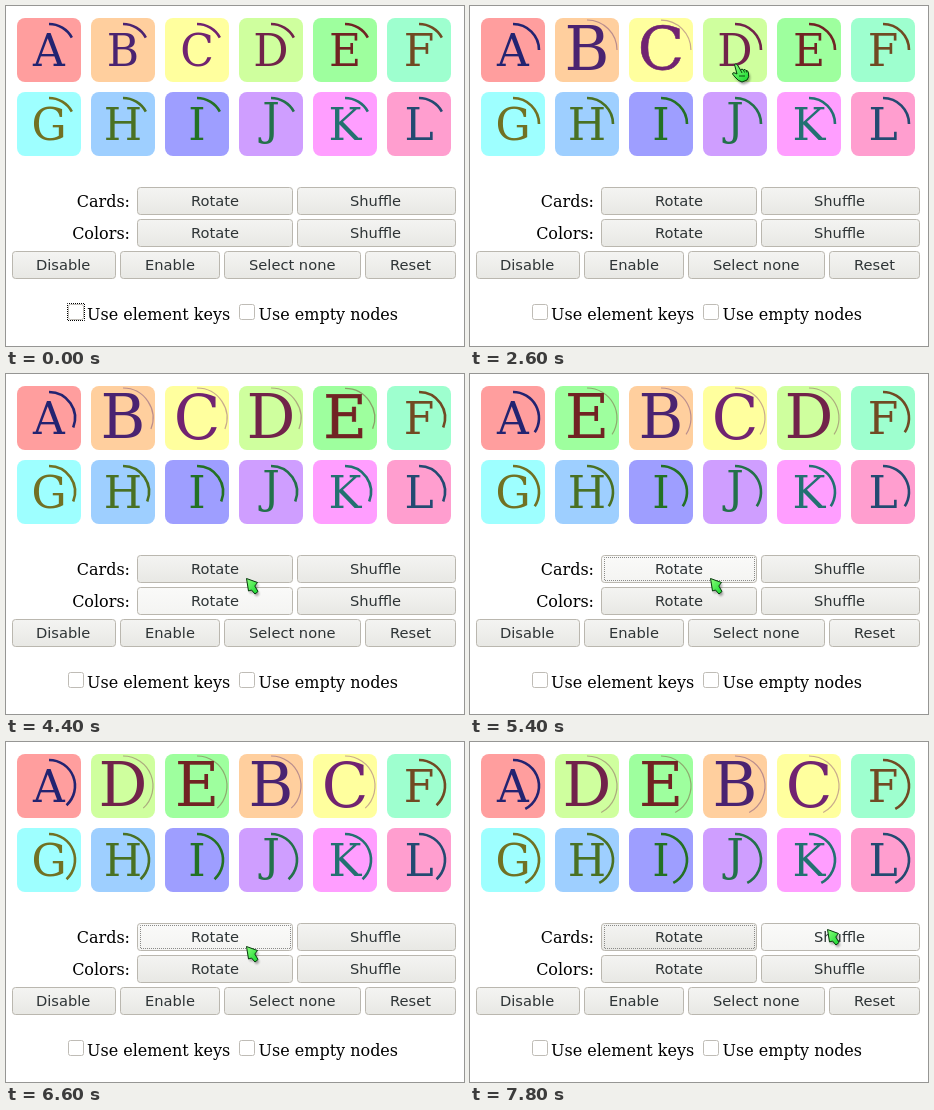
Write an HTML page that moves like this. It is 458 px wide and 340 px high and loops after 8000 ms.

```html
<!DOCTYPE html>
<html lang="en">
<head>
<meta charset="utf-8">
<title>Cards</title>
<style>
  html, body { margin: 0; width: 100%; height: 100%; overflow: hidden; background: #fff; }
  svg { display: block; }
  .letter, .label { font-family: "DejaVu Serif", serif; }
  .letter { text-anchor: middle; }
  .label { font-size: 16px; }
  .button text { font: 14.667px "DejaVu Sans", sans-serif; fill: #2e3436; }
  .button rect { fill: url(#face); stroke: #bab7af; }
  .button.hover rect { fill: url(#faceHover); }
  .focus { fill: none; stroke-dasharray: 1 1; stroke-dashoffset: .5; }
</style>
</head>
<body>
<svg id="stage" width="458" height="340" viewBox="0 0 458 340">
  <defs>
    <linearGradient id="face" x2="0" y2="1">
      <stop stop-color="#f4f4f2"/><stop offset="1" stop-color="#e8e8e4"/>
    </linearGradient>
    <linearGradient id="faceHover" x2="0" y2="1">
      <stop stop-color="#fafaf9"/><stop offset="1" stop-color="#f4f4f2"/>
    </linearGradient>
    <linearGradient id="green" x2="1" y2="1">
      <stop stop-color="#8cff7c"/><stop offset="1" stop-color="#12d62c"/>
    </linearGradient>
    <filter id="blur" x="-50%" y="-50%" width="200%" height="200%"><feGaussianBlur stdDeviation="1.3"/></filter>
  </defs>
</svg>
<script>
const LOOP = 8000, STEP = 200, FADE = 700;
const LETTERS = "ABCDEFGHIJKL";
const SELECTED_AT = { B: 1200, C: 2000, D: 2900, E: 3900 };
const ORDERS = [[0, "ABCDEFGHIJKL"], [5400, "AEBCDFGHIJKL"], [6600, "ADEBCFGHIJKL"]];
const HOVERS = [[0, -1], [4200, 2], [4600, 0], [7400, 1]];
const FOCUSES = [[0, "check"], [1200, ""], [5200, "button"]];
// time, x, y of the pointer tip
const POINTER = [
  [600, 85, 170], [800, 112, 58], [1400, 114, 58], [1600, 186, 55], [2200, 186, 55],
  [2600, 264, 58], [3000, 264, 58], [3400, 338, 58], [4000, 338, 58], [4200, 262, 227],
  [4400, 240, 204], [7000, 240, 204], [7200, 252, 206], [7400, 296, 197], [7800, 357, 187]
];
// x, y, width, caption
const BUTTONS = [
  [131, 181, 156, "Rotate"], [291, 181, 159, "Shuffle"],
  [131, 213, 156, "Rotate"], [291, 213, 159, "Shuffle"],
  [6, 245, 104, "Disable"], [114, 245, 100, "Enable"],
  [218, 245, 137, "Select none"], [359, 245, 91, "Reset"]
];
const stage = document.getElementById("stage");

function set(node, attrs) {
  for (const name in attrs) node.setAttribute(name, attrs[name]);
  return node;
}
function add(parent, tag, attrs, text = "") {
  const node = set(document.createElementNS("http://www.w3.org/2000/svg", tag), attrs);
  node.textContent = text;
  return parent.appendChild(node);
}
const mix = (a, b, p) => a + (b - a) * p;
const at = (table, t) => table.filter(row => row[0] <= t).pop()[1];

// Distance from a letter's baseline up to the middle of its ink, in em.
const ruler = document.createElement("canvas").getContext("2d");
ruler.font = '100px "DejaVu Serif", serif';
const inkMiddle = {};
for (const letter of LETTERS) {
  const ink = ruler.measureText(letter);
  inkMiddle[letter] = (ink.actualBoundingBoxAscent - ink.actualBoundingBoxDescent) / 200;
}

const cards = [...LETTERS].map((_, i) => {
  const x = 11 + 74 * (i % 6), y = 12 + 74 * Math.floor(i / 6);
  const group = add(stage, "g", { transform: `translate(${x} ${y})` });
  return {
    back: add(group, "rect", { width: 64, height: 64, rx: 8 }),
    letter: add(group, "text", { class: "letter", x: 32 }),
    arc: add(group, "path", { fill: "none" })
  };
});

const buttons = BUTTONS.map(([x, y, width, caption]) => {
  const group = add(stage, "g", { class: "button" });
  add(group, "rect", { x: x + .5, y: y + .5, width: width - 1, height: 27, rx: 3 });
  const text = add(group, "text", { y: y + 19 }, caption);
  set(text, { x: Math.floor(x + (width - text.getComputedTextLength()) / 2) });
  return group;
});

function addLabel(x, y, text, anchor = "start") {
  add(stage, "text", { class: "label", x, y, "text-anchor": anchor }, text);
}
addLabel(124, 201, "Cards:", "end");
addLabel(124, 233, "Colors:", "end");
[[62, "Use element keys", 81], [233, "Use empty nodes", 252.5]].forEach(([x, text, textX]) => {
  add(stage, "rect", { x: x + .5, y: 298.5, width: 15, height: 15, rx: 2, fill: "#fff", stroke: "#bfbcb6" });
  addLabel(textX, 314, text);
});

const focusRings = {
  check: add(stage, "rect", { class: "focus", x: 61.5, y: 297.5, width: 17, height: 17, stroke: "#000" }),
  button: add(stage, "rect", { class: "focus", x: 134.5, y: 183.5, width: 150, height: 23, stroke: "#8a8a88" })
};

const pointer = add(stage, "g", {});
function addPointer(outline, details) {
  const group = add(pointer, "g", {});
  add(group, "path", { d: outline, transform: "translate(1.5 2.5)", fill: "#000", opacity: .35, filter: "url(#blur)" });
  add(group, "path", { d: outline, fill: "url(#green)", stroke: "#06380c", "stroke-width": 1, "stroke-linejoin": "round" });
  add(group, "path", { d: details, fill: "none", stroke: "#06380c", "stroke-width": .9 });
  return group;
}
const arrow = addPointer("M.5 .5L11.5 4.5L8.8 8L12 13.5L9 16L5.5 12L2.5 13Z", "");
const hand = addPointer(
  "M.5 .5Q2-1 3.5 1L6.5 6Q8 4 9.5 6Q11 4.5 12 6.5Q14 6 14.5 9Q15.5 13 13 16L8 18Q4 17 1 13L-1.5 10Q-1.5 8 1 9L3 10Z",
  "M6.5 6L8 9M9.5 6L10.5 8.5M12 6.5L12.7 8.5M5 12H11");

function selection(letter, t) {
  const p = Math.min(1, Math.max(0, (t - (SELECTED_AT[letter] ?? LOOP)) / FADE));
  return 1 - (1 - p) ** 2;
}

function drawCard(card, letter, t) {
  const hue = 30 * LETTERS.indexOf(letter);
  const color = `hsl(${hue + 240} 53% 29%)`;
  const p = selection(letter, t);
  const size = mix(44, 61, p);
  const radius = mix(26, 30, p);
  const angle = (59 + .0119 * t) * Math.PI / 180;
  const endX = 32 + radius * Math.sin(angle), endY = 32 - radius * Math.cos(angle);

  set(card.back, { fill: `hsl(${hue} 100% 81%)` });
  set(card.letter, {
    y: mix(32, 30, p) + inkMiddle[letter] * size, "font-size": size, fill: color,
    stroke: color, "stroke-width": p > 0 && p < 1 ? .6 : 0
  });
  card.letter.textContent = letter;
  set(card.arc, {
    d: `M32 ${32 - radius}A${radius} ${radius} 0 0 1 ${endX} ${endY}`,
    stroke: color, "stroke-width": mix(2.6, 1.2, p), "stroke-opacity": mix(1, .38, p)
  });
}

function drawPointer(t) {
  const next = POINTER.findIndex(row => row[0] > t);
  const [t0, x0, y0] = POINTER[next < 0 ? POINTER.length - 1 : Math.max(0, next - 1)];
  const [t1, x1, y1] = POINTER[next < 0 ? POINTER.length - 1 : next];
  const p = t1 > t0 ? (t - t0) / (t1 - t0) : 0;
  const y = mix(y0, y1, p);
  set(pointer, {
    transform: `translate(${mix(x0, x1, p)} ${y})`,
    visibility: t < POINTER[0][0] ? "hidden" : "visible"
  });
  arrow.style.display = y < 80 ? "none" : "";
  hand.style.display = y < 80 ? "" : "none";
}

function draw(now) {
  const t = Math.max(STEP, Math.floor(now % LOOP / STEP) * STEP);
  const order = at(ORDERS, t), hover = at(HOVERS, t), focus = at(FOCUSES, t);
  cards.forEach((card, i) => drawCard(card, order[i], t));
  buttons.forEach((button, i) => button.classList.toggle("hover", i === hover));
  for (const name in focusRings) focusRings[name].style.display = name === focus ? "" : "none";
  drawPointer(t);
}

const start = performance.now();
function tick() {
  draw(performance.now() - start);
  requestAnimationFrame(tick);
}
tick();
</script>
</body>
</html>
```
